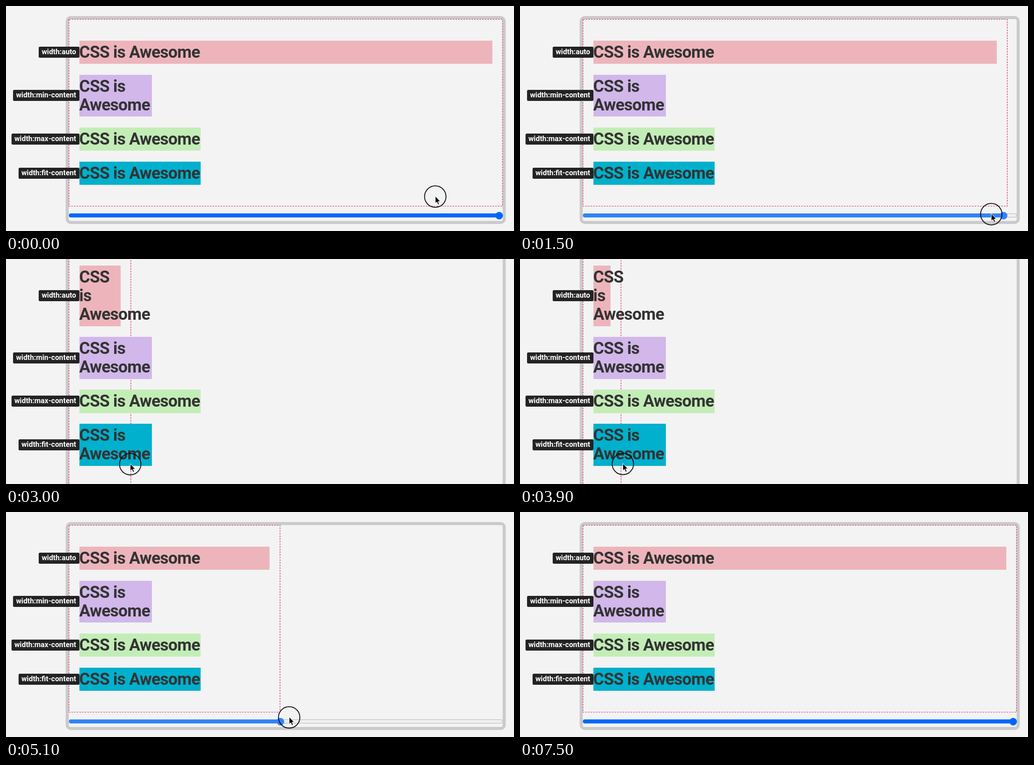
Recreate the animation shown at these times as an HTML page. Size 1010x448 px, loop 7600 ms.

```html
<!DOCTYPE html>
<html lang="en">
<head>
<meta charset="utf-8">
<title>Intrinsic widths</title>
<style>
  html, body { margin: 0; width: 100%; height: 100%; overflow: hidden; background: #f3f3f3; }
  #stage { position: relative; width: 1010px; height: 448px; overflow: hidden; font-family: Roboto, "Open Sans", sans-serif; }
  #stage div, svg { position: absolute; box-sizing: border-box; }
  svg { left: 0; top: 0; overflow: visible; }
  rect { fill: none; }
  #panel { stroke: #cacaca; stroke-width: 6; }
  #box { stroke: #d6336c; stroke-width: 1.2; stroke-dasharray: 3.2 2.1; }
  #scene { left: 0; top: 0; }
  .row { left: 145.5px; padding-top: 4px; white-space: pre; color: #333;
         font-size: 33px; font-weight: 600; line-height: 37px; letter-spacing: -0.022em; }
  .label { right: 100%; top: 50%; height: 22px; margin-top: -11px; padding: 0 6px; border-radius: 2.5px;
           background: #232323; color: #fff; font-size: 14.5px; font-weight: 700; line-height: 21px; letter-spacing: 0; }
  #slider { left: 125px; width: 862.5px; height: 8px; }
  #track { width: 100%; height: 8px; border: 1px solid #b9b9b9; border-radius: 4px; background: #efefef; }
  #fill { height: 8px; border-radius: 4px; }
  #knob { top: -3.5px; width: 15px; height: 15px; border-radius: 50%; }
</style>
</head>
<body>
<div id="stage">
  <div id="scene">
    <svg width="1" height="1">
      <rect id="panel" x="121.7" y="23" width="868.8" rx="7"/>
      <rect id="box" x="125.2" y="26.5"/>
    </svg>
    <div id="slider">
      <div id="track"></div>
      <div id="fill"></div>
      <div id="knob"></div>
    </div>
  </div>
  <svg id="cursor" width="1" height="1">
    <circle r="21.3" fill="none" stroke="#0a0a0a" stroke-width="1.7"/>
    <path d="M0 -1V13.6L3.2 10.6L5.6 16L8 15L5.7 9.7H10Z" fill="#000" stroke="#fff" stroke-width="1" stroke-linejoin="round"/>
  </svg>
</div>
<script>
const LOOP = 7600, STEP = 100, LAG = 50;
const LEFT = 125, FULL = 862.5, KNOB = 7.5, GRIP = 2.6;
const ROW_X = 145.5, ROW_Y = 68.5, PAD = 21, LINE = 37, ROW_PAD = 9.6, GAP = 21.5;
const MIN = 144.5, MAX = 241.5, TWO_WORDS = 88;
const TEXT = ["", "CSS is Awesome", "CSS is\nAwesome", "CSS\nis\nAwesome"];

// Pointer key points: time, x, y
const PATH = [
  [0, 853.5, 379.5], [1100, 977, 418.5],
  [1500, 937, 414.5], [2200, 388, 409], [2400, 306, 409],
  [3900, 204.5, 408], [5100, 563, 409], [5700, 928, 417],
  [5900, 973, 419.5], [6400, 983, 412], [7200, 955, 382]
];
const DRAG = [1100, 6400], HOVER = [900, 6600], HIDE = 7200;

const $ = id => document.getElementById(id);
const clamp = (v, lo, hi) => Math.min(hi, Math.max(lo, v));
const within = (t, [from, to]) => t >= from && t < to;
const px = v => v + "px";

// Tangent at a key point; flat where the motion turns back
function slope(i, k) {
  const at = PATH[i], a = PATH[i - 1] || at, b = PATH[i + 1] || at;
  const turns = (at[k] - a[k]) * (b[k] - at[k]) < 0;
  return turns ? 0 : (b[k] - a[k]) / (b[0] - a[0]);
}

function along(t, k) {
  const i = Math.max(1, PATH.findIndex(p => p[0] > t));
  const a = PATH[i - 1], b = PATH[i], h = b[0] - a[0];
  const u = clamp((t - a[0]) / h, 0, 1), u2 = u * u, u3 = u2 * u;
  return a[k] + (3 * u2 - 2 * u3) * (b[k] - a[k])
    + h * ((u3 - 2 * u2 + u) * slope(i - 1, k) + (u3 - u2) * slope(i, k));
}

function makeRow(name, color) {
  const el = document.createElement("div");
  el.className = "row";
  el.style.background = color;
  const text = document.createElement("span");
  const label = document.createElement("div");
  label.className = "label";
  label.textContent = "width:" + name;
  el.append(text, label);
  $("scene").append(el);
  return { el, text };
}

const rows = [
  makeRow("auto", "#edb5bb"),
  makeRow("min-content", "#d1b7ea"),
  makeRow("max-content", "#c3edb7"),
  makeRow("fit-content", "#00b0cc")
];

// Slider value; the knob trails the pointer slightly
function share(t) {
  if (!within(t, DRAG)) return 1;
  return clamp((along(t - LAG, 1) + GRIP - LEFT - KNOB) / (FULL - 2 * KNOB), 0, 1);
}

function drawRows(room, lines) {
  const widths = [room, MIN, MAX, clamp(room, MIN, MAX)];
  let y = ROW_Y;
  rows.forEach(({ el, text }, i) => {
    const height = lines[i] * LINE + ROW_PAD;
    el.style.top = px(y);
    el.style.width = px(widths[i]);
    el.style.height = px(height);
    text.textContent = TEXT[lines[i]];
    y += height + GAP;
  });
}

function draw(t) {
  const p = share(t);
  const boxWidth = Math.max(p * FULL, 2 * PAD);
  const room = LEFT + boxWidth - PAD - ROW_X;
  const autoLines = room >= MAX ? 1 : room >= TWO_WORDS ? 2 : 3;
  const fitLines = room >= MAX ? 1 : 2;
  const extra = (autoLines + fitLines - 2) * LINE;

  drawRows(room, [autoLines, 2, 1, fitLines]);
  $("scene").style.top = px(-extra / 2);
  $("panel").setAttribute("height", 408 + extra);
  $("box").setAttribute("width", boxWidth - 0.5);
  $("box").setAttribute("height", 372 + extra);

  const knobX = KNOB + p * (FULL - 2 * KNOB);
  $("slider").style.top = px(413 + extra);
  $("fill").style.width = px(knobX);
  $("knob").style.left = px(knobX - KNOB);
  $("fill").style.background = $("knob").style.background = within(t, HOVER) ? "#3283f6" : "#0067fb";

  $("cursor").style.display = t < HIDE ? "block" : "none";
  $("cursor").style.transform = `translate(${along(t, 1)}px, ${along(t, 2)}px)`;
}

const start = performance.now();
function tick() {
  const t = (performance.now() - start) % LOOP;
  draw(Math.floor(t / STEP) * STEP);
  requestAnimationFrame(tick);
}
tick();
</script>
</body>
</html>
```
